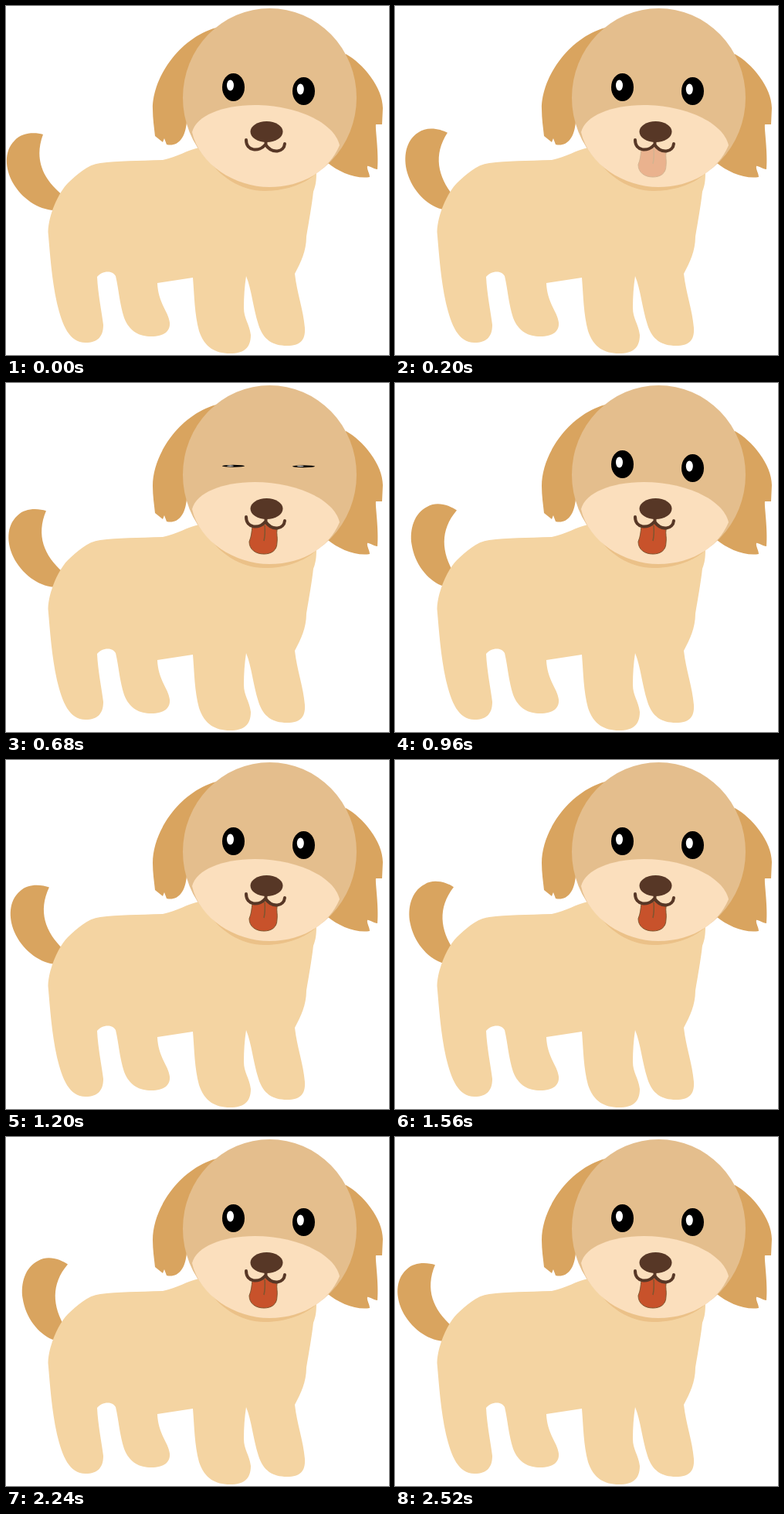
Recreate the animation shown at these times as an HTML page. Size 496x451 px, loop 2560 ms.

```html
<!DOCTYPE html>
<html lang="en">
<head>
<meta charset="utf-8">
<title>Puppy</title>
<style>
  html, body { margin: 0; width: 100%; height: 100%; overflow: hidden; background: #fff; }
  svg { display: block; width: 496px; height: 451px; }
  .fur { fill: #d9a45f; }
  .line { fill: none; stroke: #573726; stroke-width: 4; stroke-linecap: round; }
</style>
</head>
<body>
<svg viewBox="0 0 496 451">
  <path id="tail" class="fur" d="M48 166C38 163 20 163 11 174C-3 188-1 210 8 227C20 249 42 263 62 264L88 262L73 244C48 224 36 198 48 166Z"/>

  <path fill="#f4d4a2" d="M122 203C105 205 92 218 80 229C68 241 55 270 54.500 292C57 320 59 352 66 384C73 413 82 435 103 435C119 435 126 427 126 412C124 395 119 372 118 350C123 343 137 340 142 349C146 366 147 385 153 403C160 421 173 427 188 427C205 427 213 420 212 409C210 394 197 384 196 358L242 351C244 375 244 398 250 420C257 441 271 449 290 449C309 449 317 441 317 425C315 410 308 404 308 390C308 375 309 362 311 349C318 366 320 390 327 412C333 431 345 439 364 439C381 439 388 432 387 416C385 392 377 372 374 346C382 331 389 316 389 298C392 280 396 258 398 240C402 230 402 222 402 212L250 183C235 186 222 195 203 199C170 200 145 200 122 203Z"/>

  <path fill="#ebc188" d="M255 188C275 222 305 239 335 239C365 239 390 228 402 216V195Z"/>
  <path class="fur" d="M276 27C228 38 190 90 190 133C190 146 192 158 193 168L203 176L205 171L208 179C222 182 232 172 234 150L260 80Z"/>
  <path class="fur" d="M440 62C462 74 488 105 488 132L487 153H479C478 158 483 190 481 211C476 211 470 206 468 207C467 211 471 216 471 221C453 224 430 214 417 203L432 180Z"/>
  <ellipse cx="341.5" cy="118.500" rx="112.5" ry="115.500" fill="#e4be8d"/>
  <path fill="#fbdfbd" d="M241 163C246 142 280 128 322 128C375 128 425 150 432 180C418 213 384 234 341 234C297 234 250 205 241 163Z"/>

  <g id="eyes">
    <ellipse cx="294.500" cy="105" rx="14.500" ry="18"/>
    <ellipse cx="385.500" cy="110" rx="14.500" ry="18"/>
    <g fill="#fff">
      <ellipse cx="290.500" cy="102.500" rx="4.500" ry="7"/>
      <ellipse cx="381.300" cy="107.500" rx="4.500" ry="7"/>
    </g>
  </g>

  <g id="tongue" stroke="#80552f">
    <path fill="#c8522b" d="M319 186C325 187 331 186 336 182C341 187 347 189 351 189C350 195 352 200 351 206C351 217 343 221 334 221C323 221 315 215 315 205C318 198 318 192 319 186Z"/>
    <path fill="none" stroke-width="1.5" d="M335 184Q336 195 334 204"/>
  </g>
  <path class="line" d="M311 173C311 188 328 189 336 179C345 192 360 189 361 178M336.500 174V179"/>
  <ellipse cx="337.500" cy="162.500" rx="21" ry="13.500" fill="#573726"/>
</svg>
<script>
  const LOOP = 2560, STEP = 40, SWING = 320;
  const [tail, eyes, tongue] = ['tail', 'eyes', 'tongue'].map(id => document.getElementById(id));

  function draw(now) {
    const t = Math.floor(now % LOOP / STEP) * STEP;

    // The tail wags at a steady speed between its two ends.
    const wag = 1 - Math.abs(t % (2 * SWING) / SWING - 1);
    tail.setAttribute('transform', `rotate(${20 * wag} 68 256)`);

    // A quick blink starts with every swing.
    const open = Math.min(1, Math.abs(t % SWING / STEP - 1));
    const scale = 0.08 + 0.92 * open;
    eyes.setAttribute('transform', `translate(0 ${107.5 * (1 - scale)}) scale(1 ${scale})`);

    tongue.setAttribute('opacity', Math.min(1, t / 640));
    requestAnimationFrame(draw);
  }
  draw(performance.now());
</script>
</body>
</html>
```
